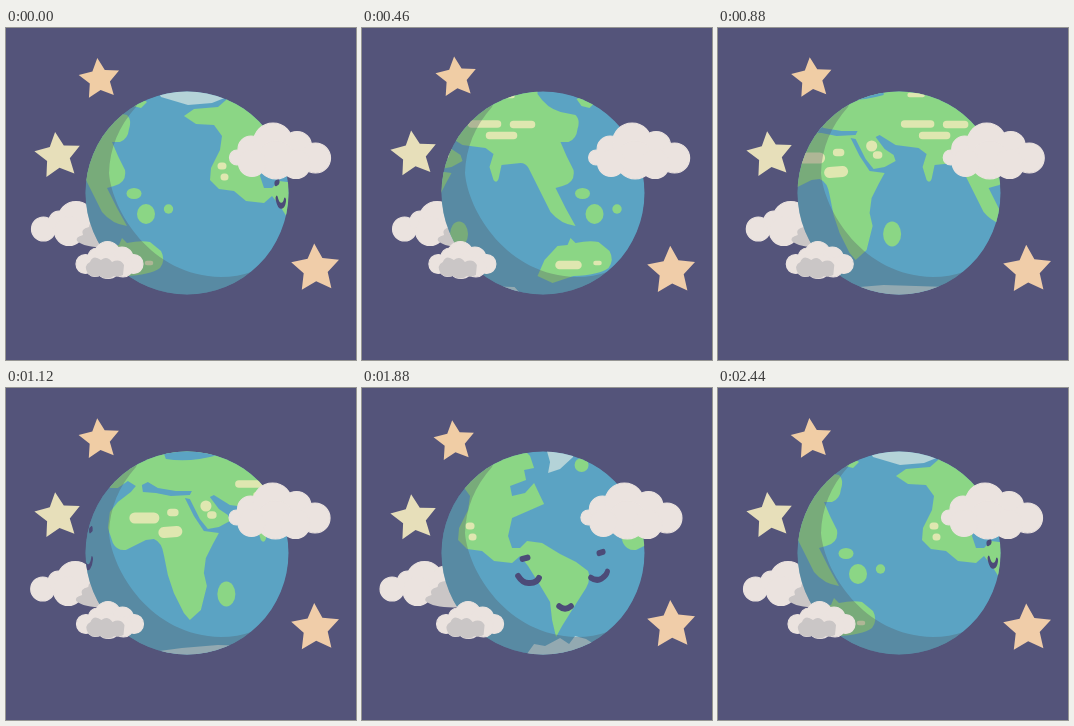
An HTML page that plays this animation: 350 by 332 pixels, repeating every 2.5 s.

```html
<!DOCTYPE html>
<html lang="en">
<head>
<meta charset="utf-8">
<title>Spinning globe</title>
<style>
  html, body { margin: 0; width: 100%; height: 100%; overflow: hidden; background: #54547a; }
  svg { display: block; width: 100vw; height: 100vh; }
  .land { fill: #8bd685; }
  .sea { fill: #5ba3c3; }
  .sand { fill: none; stroke: #dfe7b0; stroke-linecap: round; }
  .ice { fill: #b4d3d8; }
  .cloud { fill: #ebe3df; stroke: #ebe3df; stroke-width: 1.2; }
  .dim { fill: #cac6c6; }
  .shade { fill: #525a64; fill-opacity: .34; }
  #face { fill: none; stroke: #4c4b78; stroke-width: 6; stroke-linecap: round; }
</style>
</head>
<body>
<svg viewBox="0 0 350 332">
  <defs>
    <clipPath id="disc"><circle cx="181" cy="165" r="101.5"/></clipPath>
    <g id="map">
      <g transform="translate(-216)">
        <path class="land" d="M103 92L108 84L116 80L126 77L140 55H299V66Q308 80 322 84L337 87Q342 92 339 101Q338 111 330 114L322 114L328 128L335 142Q337 155 324 158L317 160L327 180L337 198Q322 196 312 184L300 160L290 140Q287 135 282 135L263 137L260 151Q258 156 255 152L251 139L255 126L247 120L224 117L208 107L204 109L213 121L222 127L224 133L213 139L202 141L194 131L184 111L179 110L188 128L198 143L213 145L207 156L200 170L198 185L201 198L195 222L184 232L178 225L168 205L162 187L158 167Q156 154 148 151L140 152L120 162Q111 163 107 155L102 140L104 124L112 114L125 104L130 98L122 93L112 100L104 100Z"/>
        <path class="sea" d="M136 97L142 94L152 100L170 103L186 103L184 107L165 108L150 105L137 104ZM156 60L160 71Q184 75 212 67V60Z"/>
        <ellipse class="land" cx="220.500" cy="206" rx="9" ry="12.500"/>
        <path class="sand" stroke-width="11" d="M129 130H148M158 144.500L171 143.500M200 118H200.100"/>
        <path class="sand" stroke-width="7.500" d="M165 124.500H169M205 127H207M233 96H259M275 96.500H293M251 107.500H275"/>
        <path class="sand" stroke-width="4.500" d="M238 67H251M268 68H274"/>
      </g>
      <g transform="translate(-62)">
        <path class="land" d="M184 71L193 67L203 74L197 80L189 78ZM178 210L183 215Q197 212 206 214L217 223Q222 232 216 240Q206 247 181 248L160 255L145 248L152 232L165 218L175 217Z"/>
        <ellipse class="land" cx="190" cy="165.500" rx="7.500" ry="5.500"/>
        <ellipse class="land" cx="202" cy="186" rx="9" ry="10"/>
        <circle class="land" cx="224.500" cy="181" r="4.700"/>
        <path class="sand" stroke-width="8.500" d="M167 237H185"/>
        <path class="sand" stroke-width="4.500" d="M203 235H207"/>
      </g>
      <g transform="translate(-370)">
        <path class="land" d="M70 88L80 81L104 79L112 72L118 60H160L168 68L172 80L162 82L164 92L148 98L150 108L163 105L172 95L182 116L150 130L146 148L150 160L158 160L165 153L180 155L198 166L214 174L226 183Q229 191 224 200L210 222L200 238L194 249L190 232L188 214L176 194L166 178L158 168L150 175L132 173L120 163L105 161L96 152L97 140L106 122L108 108L100 97L82 96Z"/>
        <circle class="land" cx="219.500" cy="77" r="7"/>
        <path class="ice" d="M184 60L188 74L186 85L198 81L211 69L210 60Z"/>
        <path class="sand" stroke-width="7" d="M107 138H109M110 149H111"/>
      </g>
      <path class="ice" d="M150 60L155 69L182 77L206 75L221 69L215 60ZM-208 270L-198 256L-187 258L-172 250L-163 256L-157 248L-146 251L-135 258L-112 264H-70L-40 260L-4 257L60 259L70 270Z"/>
    </g>
  </defs>

  <rect width="350" height="332" fill="#54547a"/>
  <g id="stars"></g>

  <g id="west">
    <g class="cloud">
      <circle cx="37.500" cy="201" r="12"/><circle cx="53" cy="193" r="10"/>
      <circle cx="70" cy="191.500" r="18"/><circle cx="63" cy="203" r="14.500"/>
      <circle cx="92" cy="196" r="18"/>
    </g>
    <path class="dim" d="M110 193H92Q83 193 83 199Q74 201 77 207Q69 209 71 213Q80 221 110 219Z"/>
  </g>

  <g clip-path="url(#disc)">
    <circle class="sea" cx="181" cy="165" r="102"/>
    <g id="strip">
      <use href="#map" x="-478"/><use href="#map"/><use href="#map" x="478"/>
    </g>
    <path class="shade" d="M130 79Q104 108 103 145C106 183 145 248 215 249Q232 249 245 244L300 290H60V50H140Z"/>
    <g id="face"></g>
  </g>

  <g id="east" class="cloud">
    <circle cx="231" cy="129.500" r="7.500"/><circle cx="245" cy="121" r="13"/>
    <circle cx="267" cy="114.500" r="19.500"/><circle cx="291" cy="118" r="14.500"/>
    <circle cx="309.500" cy="130" r="15"/><circle cx="270" cy="132" r="19"/>
    <circle cx="246" cy="135" r="13.500"/><circle cx="290" cy="136" r="14.500"/>
  </g>

  <g id="front">
    <g class="cloud">
      <circle cx="79.500" cy="236" r="9.500"/><circle cx="91" cy="229" r="9"/>
      <circle cx="101.500" cy="226" r="12.500"/><circle cx="116" cy="230" r="11"/>
      <circle cx="127.500" cy="236" r="9.500"/><circle cx="102" cy="238" r="12.500"/>
      <circle cx="117" cy="239" r="10"/><circle cx="89" cy="240" r="8.500"/>
    </g>
    <path class="dim" d="M82 246Q77 237 84 234Q87 226 95 232Q101 227 106 234Q114 230 118 237L117 247Q112 250 108 248Q101 253 94 248Q87 250 82 246Z"/>
  </g>
</svg>
<script>
const LOOP = 2500, STEPS = 31, WIDTH = 478, CENTER = 181, RADIUS = 102;
const TICKS = [50, 170, 230, 290, 410, 460, 580, 640, 700, 820, 880, 940, 1000, 1120,
  1170, 1290, 1350, 1470, 1530, 1590, 1650, 1770, 1820, 1880, 1940, 2060, 2120,
  2240, 2300, 2360, 2440];

const $ = id => document.getElementById(id);
function move(el, x, y = 0, squash = 1) {
  el.setAttribute('transform', `translate(${x.toFixed(2)} ${y.toFixed(2)}) scale(${squash.toFixed(3)} 1)`);
}
function addPath(parent, d, fill) {
  const p = document.createElementNS('http://www.w3.org/2000/svg', 'path');
  p.setAttribute('d', d);
  if (fill) p.setAttribute('fill', fill);
  return parent.appendChild(p);
}

function starPath(cx, cy, r, tilt) {
  const pts = Array.from({ length: 10 }, (_, i) => {
    const a = (i * 36 + tilt - 90) * Math.PI / 180, q = i % 2 ? r * 0.5 : r;
    return `${(cx + q * Math.cos(a)).toFixed(1)} ${(cy + q * Math.sin(a)).toFixed(1)}`;
  });
  return 'M' + pts.join('L') + 'Z';
}

// x, y, radius, tilt, colour, sway x, sway y
const stars = [
  [93.3, 51.7, 21.3, -6, '#f0cda5', 1, -2],
  [52, 128.3, 24, -7, '#e7dfba', 0, -2],
  [309.5, 240, 25.2, -3, '#f0cda9', 0, 3]
].map(([x, y, r, tilt, fill, sx, sy]) => ({ el: addPath($('stars'), starPath(x, y, r, tilt), fill), sx, sy }));

const brow = 'M-2.500 .7L2.500 -.7';
// shape, map x, then the arc it rides on: bend, lowest x, lowest y
const face = [
  [brow, -207, .00196, 180, 170.8],
  ['M-11 -4Q-6 4 1 3Q8 3 10 -2', -203, .00136, 162, 192],
  ['M-6 -1Q0 4 6 -1', -167, .0012, 165, 221],
  [brow, -131, .00247, 192, 170],
  ['M-10 2Q-3 6 3 3Q9 0 10 -4', -133, .00253, 176, 197]
].map(([d, u, bend, low, base]) => ({ el: addPath($('face'), d), u, bend, low, base }));

function draw(time) {
  const t = time % LOOP;
  const step = TICKS.filter(k => k <= t).length % STEPS;
  const shift = step * WIDTH / STEPS;
  const sway = Math.cos(2 * Math.PI * (step - 6.7) / STEPS);

  move($('strip'), shift);
  for (const f of face) {
    const dx = (f.u + shift - CENTER + WIDTH * 2.5) % WIDTH - WIDTH / 2, x = CENTER + dx;
    const squash = Math.sqrt(Math.max(0.1, 1 - (dx / RADIUS) ** 2));
    move(f.el, x, f.base - f.bend * (x - f.low) ** 2, squash);
  }
  const d = sway - 0.21;
  move($('west'), 6.5 * d);
  move($('east'), 4 * d);
  move($('front'), -4 * d);
  for (const s of stars) move(s.el, s.sx * sway, s.sy * sway);
}

const start = performance.now();
function tick() {
  draw(performance.now() - start);
  requestAnimationFrame(tick);
}
tick();
</script>
</body>
</html>
```
